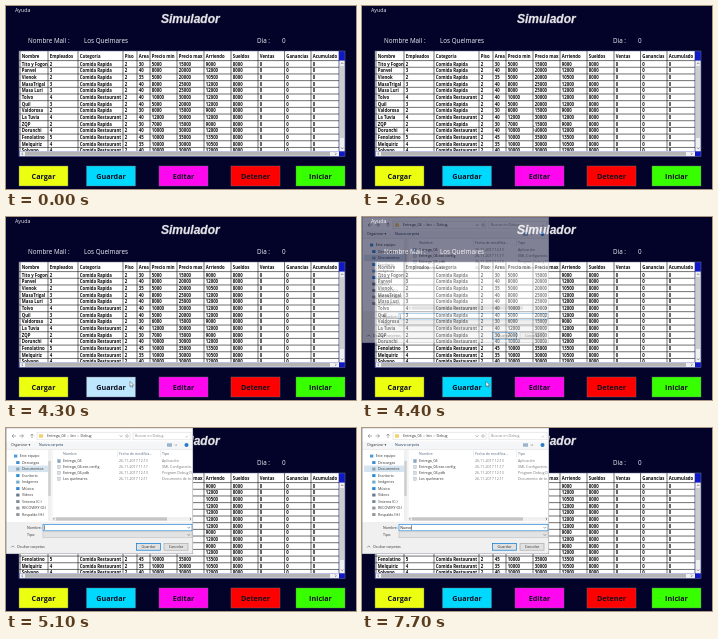
An HTML page for the animation above (8 s loop, 350 by 183 pixels).

```html
<!DOCTYPE html>
<html lang="es">
<head>
<meta charset="utf-8">
<title>Simulador</title>
<style>
  html, body { margin: 0; width: 100%; height: 100%; overflow: hidden; background: #03032a; }
  #stage { display: block; width: 100vw; height: 100vh; }
  text { font-family: "Open Sans", "Noto Sans", sans-serif; white-space: pre; }
</style>
</head>
<body>
<svg id="stage" viewBox="0 0 350 183" preserveAspectRatio="none"></svg>
<script>
const LOOP = 8000, STEP = 100;
const stage = document.getElementById('stage');

function add(parent, tag, attrs = {}) {
  const el = document.createElementNS('http://www.w3.org/2000/svg', tag);
  for (const key in attrs) el.setAttribute(key, attrs[key]);
  return parent.appendChild(el);
}
const rect = (parent, x, y, width, height, fill, more) =>
  add(parent, 'rect', { x, y, width, height, fill, ...more });
const path = (parent, d, stroke, more) =>
  add(parent, 'path', { d, stroke, fill: 'none', 'stroke-width': .6, ...more });
function label(parent, x, y, str, size, fill, more) {
  const el = add(parent, 'text', { x, y, 'font-size': size, fill, ...more });
  el.textContent = str;
  return el;
}

// Main window
rect(stage, 0, 0, 350, 183, '#03032a');
label(stage, 9, 5.6, 'Ayuda', 5.3, '#e8e8f0');
label(stage, 155, 17.4, 'Simulador', 12, '#e4e4e8', {
  style: 'font-family: "Liberation Sans", Arial, sans-serif', 'font-weight': 700, 'font-style': 'italic',
  stroke: '#77778a', 'stroke-width': .5, 'paint-order': 'stroke'
});
[[22, 'Nombre Mall :'], [78, 'Los Quelmares'], [251, 'Dia :'], [276, '0']]
  .forEach(([x, str]) => label(stage, x, 37.2, str, 6.3, '#f4f4fa'));

// Shop table
const edges = [14, 42, 72, 117, 131, 144, 171, 198, 225, 252, 278.5, 305, 333];
const headers = ['Nombre', 'Empleados', 'Categoria', 'Piso', 'Area', 'Precio min', 'Precio max',
  'Arriendo', 'Sueldos', 'Ventas', 'Ganancias', 'Acumulado'];
// name, staff, kind, area, lowest and highest price in thousands
const shops = [
  ['Tito y Fogones', 2, 'Rapida', 30, 5, 15],
  ['Panvel', 3, 'Rapida', 40, 8, 20],
  ['Vienok', 2, 'Rapida', 35, 5, 20],
  ['MasaTrigal', 3, 'Rapida', 40, 8, 25],
  ['Masa Luri', 3, 'Rapida', 40, 8, 25],
  ['Tolvo', 4, 'Restaurant', 40, 10, 30],
  ['Quil', 3, 'Rapida', 40, 5, 20],
  ['Valdorosa', 2, 'Rapida', 30, 6, 15],
  ['La Tuvia', 4, 'Restaurant', 40, 12, 30],
  ['ZQP', 2, 'Rapida', 30, 7, 15],
  ['Dorunchi', 4, 'Restaurant', 40, 10, 30],
  ['Fenolatino', 5, 'Restaurant', 45, 10, 35],
  ['Melquiriz', 4, 'Restaurant', 35, 10, 30],
  ['Solvano', 4, 'Restaurant', 40, 10, 30]
];
const ROW = 6.68, TOP = 54.6, BOTTOM = 145.3;

rect(stage, 13, 45, 326, 105.5, '#1018c8');
const grid = add(stage, 'svg', { x: 13, y: 45, width: 320, height: BOTTOM - 45, viewBox: `13 45 320 ${BOTTOM - 45}` });
rect(grid, 13, 45, 320, 102, '#fff');

function tableRow(y, height, values) {
  values.forEach((value, i) => {
    const width = edges[i + 1] - edges[i];
    const cell = add(grid, 'svg', { x: edges[i], y, width, height });
    label(cell, 1.8, height / 2 + 1.6, value, 4.3, '#080808', { 'font-weight': 700 });
  });
  path(grid, `M13 ${y + height}H333`, '#111');
}
tableRow(45.5, TOP - 45.5, headers);
shops.forEach(([name, staff, kind, area, low, high], i) => tableRow(TOP + i * ROW, ROW,
  [name, staff, 'Comida ' + kind, 2, area, low * 1000, high * 1000, area * 300, 8000, 0, 0, 0]));
edges.forEach(x => path(grid, `M${x} 45V147`, '#111'));

// Scrollbars leave the corners of the table uncovered
rect(stage, 333.3, TOP, 5.5, BOTTOM - TOP, '#f0f0f0');
rect(stage, 333.9, 60, 4.3, 72, '#cdcdcd');
rect(stage, 13.5, BOTTOM, 319.5, 5, '#f0f0f0');
rect(stage, 19, BOTTOM + .6, 305, 3.8, '#b4b4b4');
path(stage, 'M335 58l1.2 -1.3l1.2 1.3M335 141.5l1.2 1.3l1.2 -1.3M17 146.5l-1.3 1.3l1.3 1.3M329 146.5l1.3 1.3l-1.3 1.3', '#555');
rect(stage, 13, 45, 326, 105.5, 'none', { stroke: '#6c7388', 'stroke-width': .5 });

// Buttons
function bigButton(x, fill, str) {
  const box = rect(stage, x, 160, 49, 20, fill, { stroke: '#707070', 'stroke-width': .4 });
  label(stage, x + 24.5, 172.6, str, 7.2, '#101020', { 'font-weight': 700, 'text-anchor': 'middle' });
  return box;
}
const CYAN = '#00d9ff';
bigButton(13, '#ecff10', 'Cargar');
const saveButton = bigButton(80.5, CYAN, 'Guardar');
bigButton(153, '#ff08f0', 'Editar');
bigButton(225, '#ff0000', 'Detener');
bigButton(290, '#38ff00', 'Iniciar');

// Save dialog
const dialog = add(stage, 'g');
const INK = '#333', small = (x, y, str, fill = INK) => label(dialog, x, y, str, 3.6, fill);
rect(dialog, 0, 0, 187, 126, '#fff');
path(dialog, 'M6 8h4M7.8 6.2L6 8l1.8 1.8M13.5 8h4M15.7 6.2L17.5 8l-1.8 1.8M26 10V6M24.5 7.5L26 6L27.5 7.5', '#777');
rect(dialog, 31, 4.2, 93, 7.6, '#fff', { stroke: '#d4d4d4', 'stroke-width': .5 });
rect(dialog, 33, 6.3, 4, 3.4, '#f3d06a');
small(41, 9.3, 'Entrega_04  ›  bin  ›  Debug');
path(dialog, 'M113.8 7.4l1.3 1.3l1.3 -1.3', '#666');
add(dialog, 'circle', { cx: 121, cy: 8, r: 1.3, fill: 'none', stroke: '#888', 'stroke-width': .5 });
rect(dialog, 127, 4.2, 58, 7.6, '#fff', { stroke: '#d4d4d4', 'stroke-width': .5 });
small(129, 9.3, 'Buscar en Debug', '#888');
path(dialog, 'M180 9.5l1.6 -1.6', '#888');

rect(dialog, 0, 13.5, 187, 7.8, '#f5f6f7');
small(5, 18.4, 'Organizar ▾');
small(33, 18.4, 'Nueva carpeta', '#1e395b');
rect(dialog, 161, 15.3, 5, 3.4, '#9ab4cc');
path(dialog, 'M168.8 16.5l1.1 1.1l1.1 -1.1', '#666');
add(dialog, 'circle', { cx: 180.5, cy: 17, r: 2, fill: '#2878c8' });
path(dialog, 'M0 21.4H187M46 21.4V94', '#e0e0e0');

rect(dialog, 2, 37.6, 40, 6.5, '#d5e4ef');
[['Este equipo', '#4a9bd8'], ['Descargas', '#3e8ed0'], ['Documentos', '#8aa4b8'], ['Escritorio', '#2a91d8'],
 ['Imágenes', '#73a9c9'], ['Música', '#2c85d6'], ['Vídeos', '#68798d'], ['Sistema (C:)', '#7c8d9c'],
 ['RECOVERY (D:)', '#8f969d'], ['Respaldo (H:)', '#8f969d']].forEach(([name, color], i) => {
  const y = 29.4 + i * 6.5, indent = i ? 2.2 : 0;
  rect(dialog, 8 + indent, y - 2.8, 3.3, 2.9, color);
  small(13.8 + indent, y, name);
});
rect(dialog, 42, 22, 3, 71, '#f0f0f0');
rect(dialog, 42.3, 33, 2.4, 35, '#cdcdcd');

[[57, 'Nombre'], [113, 'Fecha de modifica...'], [156, 'Tipo']].forEach(([x, str]) => small(x, 27, str, '#5a6b80'));
path(dialog, 'M111.5 22V29M154.5 22V29', '#e4e4e4');
[['Entrega_04', '12:13', 'Aplicación'], ['Entrega_04.exe.config', '11:17', 'XML Configuratio...'],
 ['Entrega_04.pdb', '12:13', 'Program Debug D...'], ['Los quelmares', '12:11', 'Documento de te...']].forEach(([name, hour, kind], i) => {
  const y = 34.4 + i * 5.9;
  rect(dialog, 51.5, y - 3, 3, 3.4, i ? '#d9dee4' : '#87a8ca', { stroke: '#9aa3ad', 'stroke-width': .3 });
  small(57, y, name);
  small(113, y, `26-11-2017 ${hour}`, '#777');
  const cell = add(dialog, 'svg', { x: 156, y: y - 5, width: 30, height: 7 });
  label(cell, 0, 5, kind, 3.6, '#777');
});
rect(dialog, 46, 89, 140.5, 4, '#f0f0f0');
rect(dialog, 50, 89.4, 111, 3.2, '#c4c4c4');
path(dialog, 'M48.6 89.8l-1.2 1.2l1.2 1.2M183.8 89.8l1.2 1.2l-1.2 1.2', '#555');

rect(dialog, 0, 94, 187, 32, '#f0f0f0');
small(21, 101, 'Nombre:');
small(21, 108, 'Tipo:');
rect(dialog, 37, 96.4, 149, 6.4, '#fff', { stroke: '#2a8ad8', 'stroke-width': .7 });
rect(dialog, 37, 103.8, 149, 6, '#e3e3e3', { stroke: '#b8b8b8', 'stroke-width': .5 });
path(dialog, 'M181.5 99l1.3 1.3l1.3 -1.3M181.5 106.2l1.3 1.3l1.3 -1.3', '#666');
path(dialog, 'M5.2 119.4l1.5 -1.5l1.5 1.5', '#555');
small(11, 120.2, 'Ocultar carpetas');
function smallButton(x, stroke, str) {
  rect(dialog, x, 115.4, 24, 6.8, '#e1e1e1', { stroke, 'stroke-width': .7 });
  label(dialog, x + 12, 120.1, str, 3.6, INK, { 'text-anchor': 'middle' });
}
smallButton(130.5, '#0078d7', 'Guardar');
smallButton(158, '#adadad', 'Cancelar');
rect(dialog, .2, 0, 186.6, 125.8, 'none', { stroke: '#8c93a0', 'stroke-width': .5 });
const typed = small(38.3, 101, '', '#111');
const caret = rect(dialog, 38.3, 97.3, .5, 4.6, '#111');

const pointer = add(stage, 'path', {
  d: 'M0 0V5.2L1.3 4.1L2.1 5.9L2.9 5.5L2.1 3.8L3.7 3.7Z',
  fill: '#fff', stroke: '#222', 'stroke-width': .4
});

// Timeline: time, x, y
const route = [[500, 346, 142], [900, 304, 118], [1300, 263, 104], [1500, 250, 103], [1900, 230, 103],
  [2100, 228, 103], [2500, 182, 116], [2900, 140, 131], [3400, 128, 151], [3700, 125, 163], [3900, 124, 164.5]];
const keys = [6100, 6400, 6500, 6800, 7000];
const caretOff = [[4900, 5000], [5400, 5900], [7400, 7700]];

function pointerAt(t) {
  const i = route.findIndex(stop => stop[0] > t);
  if (i < 0) return route[route.length - 1].slice(1);
  const [t0, x0, y0] = route[Math.max(i - 1, 0)], [t1, x1, y1] = route[i];
  const k = t1 > t0 ? (t - t0) / (t1 - t0) : 0;
  return [x0 + (x1 - x0) * k, y0 + (y1 - y0) * k];
}
const show = (el, on) => el.setAttribute('visibility', on ? 'visible' : 'hidden');

function render(t) {
  const [x, y] = pointerAt(t);
  pointer.setAttribute('transform', `translate(${x} ${y})`);
  show(pointer, t >= 500 && t < 4900);
  saveButton.setAttribute('fill', t >= 3700 && t < 4400 ? '#bee6fd' : CYAN);

  dialog.setAttribute('opacity', t < 4400 ? 0 : t < 4500 ? .5 : t < 4600 ? .94 : 1);
  const count = keys.filter(time => time <= t).length;
  typed.textContent = 'Nuevo'.slice(0, count);
  caret.setAttribute('x', 38.3 + (count ? typed.getComputedTextLength() + .2 : 0));
  caret.setAttribute('opacity', caretOff.some(([from, to]) => t >= from && t < to) ? 0 : 1);
}

const start = performance.now();
function tick() {
  const t = (performance.now() - start) % LOOP;
  render(Math.floor(t / STEP) * STEP);
  requestAnimationFrame(tick);
}
tick();
</script>
</body>
</html>
```
